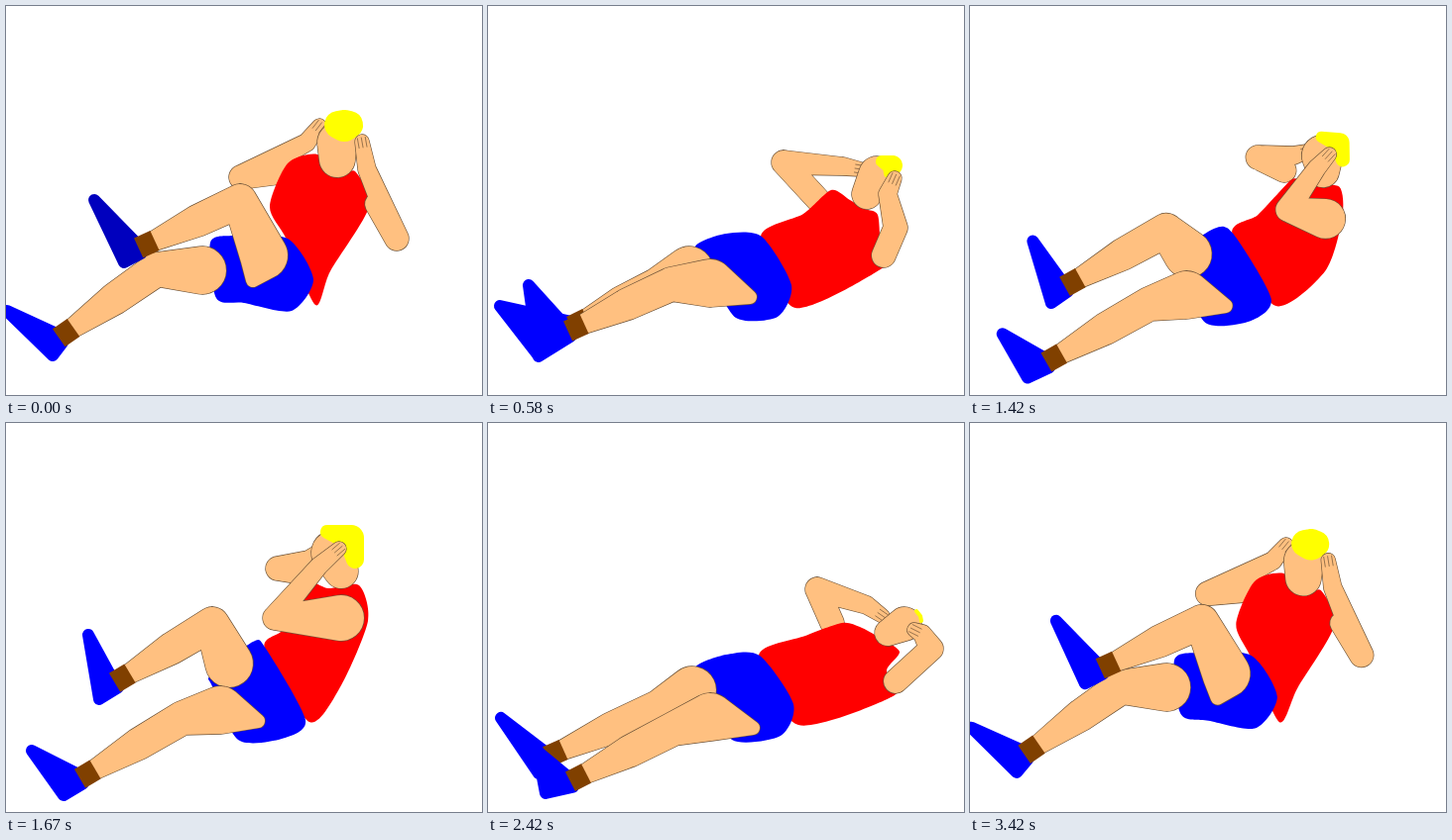
An HTML page for the animation above (3.51 s loop, 480 px wide and 393 px high).

```html
<!DOCTYPE html>
<html lang="en">
<head>
<meta charset="utf-8">
<title>Bicycle crunch</title>
<style>
html, body { margin: 0; width: 100%; height: 100%; overflow: hidden; background: #fff; }
svg { display: block; width: 100%; height: 100%; }
path { fill: none; stroke-linejoin: round; }
.skin { fill: #ffc080; stroke: #6b5136; stroke-width: 1.3; paint-order: stroke; }
.line { stroke: #6b5136; stroke-width: 0.7; stroke-linecap: round; }
.shirt { fill: #f00; }
.shorts { fill: #00f; }
.hair { fill: #ff0; }
.shoe { fill: #00f; stroke: #00f; stroke-width: 12; }
.shoe.dark { fill: #0000be; stroke: #0000be; }
.sock { stroke: #804000; stroke-width: 22; }
</style>
</head>
<body>
<svg id="stage" viewBox="0 0 480 393"></svg>
<script>
// Key points x,y[,radius] in four poses: near knee up, going down, lying, far knee up.
const rig = {
  // shoulder, elbow, wrist, hand
  farArm: ['283,167 237,173 303,138 316,121', '333,196 298,158 358,162 376,165',
           '347,202 332,168 382,184 398,195', '305,152 274,147 305,138 318,128'],
  nearArm: ['373,200,11 394,235 364,165 359,137', '399,252,12 411,224 403,190 410,174',
            '411,261,12 447,228 438,213 430,209', '338,197,23 271,197 315,145 336,127'],
  // ankle, knee, hip, and for the near leg the lower end of the thigh
  farLeg: ['68,325 152,266 198,267', '100,316 170,282 203,267',
           '76,330 172,287 206,270', '125,253 208,203 225,243'],
  nearLeg: ['150,237 236,197 260,252 249,277', '97,321 185,281 224,280 264,294',
            '99,354 187,309 224,297 267,308', '90,350 178,298 216,290 254,301'],
  // toe, heel
  farFoot: ['1,308 47,353', '12,303 50,352', '13,298 51,354', '83,214 94,279'],
  nearFoot: ['89,196 119,259', '41,282 51,354', '50,332 58,374', '26,331 58,376'],
  // crown, chin
  head: ['334,138,20 334,155,18', '392,170,18 382,190,15', '420,203,17 403,212,13', '330,131,22 338,150,17'],
  hair: ['335,120,14 341,121,16 346,120,14', '397,157,6 408,161,10 404,169,5',
         '432,190,2 436,195,2 437,200,2', '324,110,7 348,116,13 352,138,9'],
  // neckline, back, hem, front
  shirt: ['314,150 334,173 352,167 366,203 327,268 312,302 283,236 266,203 284,159',
          '365,196 380,205 393,211 396,245 402,262 310,305 275,233 318,210 346,186',
          '375,206 395,217 415,231 402,250 410,275 313,305 273,235 320,215 357,202',
          '308,162 325,167 356,164 365,200 338,265 306,302 261,228 278,210 293,184'],
  // waist, seat, leg opening
  shorts: ['206,239 231,232 284,235 310,276 288,308 240,300 212,295',
           '209,243 240,230 276,233 306,282 292,314 250,315 224,270',
           '209,247 240,234 274,235 308,284 295,316 246,320 226,270',
           '207,254 249,221 262,228 302,300 278,319 234,320 208,266']
};
for (const name in rig) {
  rig[name] = rig[name].map(s => s.split(' ').map(p => p.split(',').map(Number)));
}

const ARM = [12, 12, 9, 7], LEG = [10, 16, 17, 24, 7], SOCK = 18;

const stage = document.getElementById('stage');
function layer(className) {
  const node = document.createElementNS('http://www.w3.org/2000/svg', 'path');
  node.setAttribute('class', className);
  stage.append(node);
  return d => node.setAttribute('d', d);
}
const legLayers = () => ({ shoe: layer('shoe'), leg: layer('skin'), sock: layer('sock') });
const armLayers = () => ({ arm: layer('skin'), fingers: layer('line') });

const farArm = armLayers(), shirt = layer('shirt'), shorts = layer('shorts'),
      farLeg = legLayers(), nearLeg = legLayers(),
      head = layer('skin'), hair = layer('hair'), nearArm = armLayers();
const nearShoe = stage.querySelectorAll('.shoe')[1];

const mix = (a, b, share) => a.map((v, i) => v + (b[i] - v) * share);
const polar = ([x, y], r, angle) => [x + r * Math.cos(angle), y + r * Math.sin(angle)];
const heading = (a, b) => Math.atan2(b[1] - a[1], b[0] - a[0]);

// Two circles joined by their outer tangents.
function bone(a, ra, b, rb) {
  const dist = Math.hypot(b[0] - a[0], b[1] - a[1]);
  if (dist <= Math.abs(ra - rb)) {
    const [c, r] = ra > rb ? [a, ra] : [b, rb];
    return `M${c[0] - r},${c[1]}a${r},${r} 0 1 1 ${2 * r},0a${r},${r} 0 1 1 ${-2 * r},0Z`;
  }
  const angle = heading(a, b), spread = Math.acos((ra - rb) / dist);
  return `M${polar(a, ra, angle + spread)}A${ra},${ra} 0 ${+(ra > rb)} 1 ${polar(a, ra, angle - spread)}` +
    `L${polar(b, rb, angle - spread)}A${rb},${rb} 0 ${+(rb > ra)} 1 ${polar(b, rb, angle + spread)}Z`;
}

function limb(joints, radii = []) {
  const r = i => joints[i][2] ?? radii[i];
  return joints.slice(1).map((p, i) => bone(joints[i], r(i), p, r(i + 1))).join('');
}

// Smooth closed curve through the points.
function blob(pts, bend = 0.13) {
  const at = i => pts[(i + pts.length) % pts.length];
  const handle = (i, sign) => at(i).map((v, a) => v + sign * bend * (at(i + 1)[a] - at(i - 1)[a]));
  return `M${pts[0]}` + pts.map((p, i) => `C${handle(i, 1)} ${handle(i + 1, -1)} ${at(i + 1)}`).join('') + 'Z';
}

function drawLeg(layers, joints, [toe, heel]) {
  const [ankle, knee] = joints;
  const angle = heading(knee, ankle);
  const end = polar(ankle, SOCK, angle);
  layers.shoe(`M${toe}L${polar(end, 6, angle + Math.PI / 2)}L${polar(end, 6, angle - Math.PI / 2)}L${heel}Z`);
  layers.leg(limb([ankle, mix(ankle, knee, 0.5), ...joints.slice(1)], LEG));
  layers.sock(`M${ankle}L${end}`);
}

function drawArm(layers, joints) {
  const [, , wrist, hand] = joints;
  const angle = heading(wrist, hand);
  layers.arm(limb(joints, ARM));
  layers.fingers([-4, 0, 4].map(side => {
    const knuckle = polar(hand, side, angle + Math.PI / 2);
    return `M${polar(knuckle, -6, angle)}L${polar(knuckle, 4, angle)}`;
  }).join(''));
}

// Step 0..21 to [pose, share of the next pose]; shares above 1 overshoot.
function blend(step) {
  if (step <= 7) return [0, (step / 7) ** 1.6];
  if (step <= 11) return [1, 1.12 * (1 - (1 - (step - 7) / 4) ** 1.8)];
  if (step < 13) return [1, 1.08];
  if (step <= 20) return [2, 1 - (1 - (step - 13) / 7) ** 1.5];
  return [2, 1.04];
}

function draw(step) {
  const [from, share] = blend(step);
  const now = name => rig[name][from].map((p, i) => mix(p, rig[name][from + 1][i], share));
  drawArm(farArm, now('farArm'));
  shirt(blob(now('shirt')));
  shorts(blob(now('shorts')));
  drawLeg(farLeg, now('farLeg'), now('farFoot'));
  drawLeg(nearLeg, now('nearLeg'), now('nearFoot'));
  head(limb(now('head')));
  hair(limb(now('hair')));
  drawArm(nearArm, now('nearArm'));
  nearShoe.classList.toggle('dark', step === 0);
}

// 42 drawings at 12 per second; the second half runs backwards.
const LOOP = 3510, COUNT = 42;
const start = performance.now();
let shown = -1;
function tick() {
  const t = (performance.now() - start) % LOOP;
  const index = Math.min(COUNT - 1, Math.floor((t + 5) * 12 / 1000));
  const step = Math.min(index, COUNT - index);
  if (step !== shown) draw(shown = step);
  requestAnimationFrame(tick);
}
tick();
</script>
</body>
</html>
```
